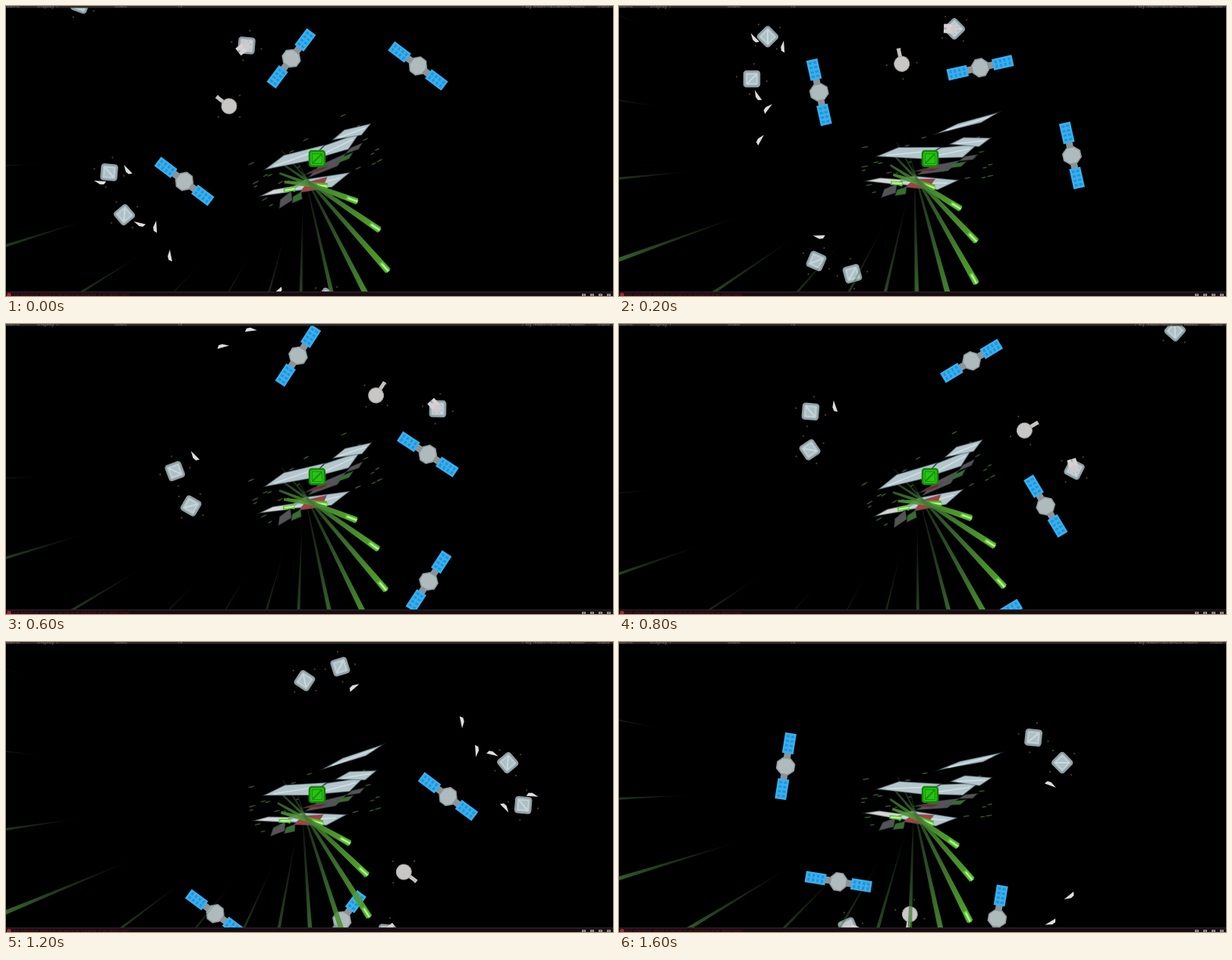
An HTML page with a canvas for the animation above (1.7 s loop, 800 by 382 pixels).

```html
<!DOCTYPE html>
<html>
<head>
<meta charset="utf-8">
<style>
html, body { margin: 0; height: 100%; overflow: hidden; background: #000; }
canvas { display: block; }
</style>
</head>
<body>
<canvas id="stage" width="800" height="382"></canvas>
<script>
const ctx = document.getElementById('stage').getContext('2d');
const LOOP = 1700, STEP = 100, CX = 410, CY = 201, RAD = Math.PI / 180;
const TURN_RATE = 0.142; // degrees per ms

// Uneven swing on top of the steady turn: time (ms), degrees
const SWING = [[0, 0], [200, 11.9], [600, 1], [1000, -4.4], [1200, 9.2], [1400, -7.5], [1600, 14.8]];
function swingAt(t) {
  const next = Math.max(1, SWING.findIndex(([time]) => time >= t));
  const [t0, a] = SWING[next - 1], [t1, b] = SWING[next];
  return a + (b - a) * (t - t0) / (t1 - t0);
}

function placed(x, y, angle, draw) {
  ctx.save();
  ctx.translate(x, y);
  ctx.rotate(angle * RAD);
  draw();
  ctx.restore();
}
function rect(x, y, w, h, color) {
  ctx.fillStyle = color;
  ctx.fillRect(x, y, w, h);
}
function paint(fill, edge, width) {
  ctx.fillStyle = fill;
  ctx.fill();
  if (!edge) return;
  ctx.lineWidth = width;
  ctx.strokeStyle = edge;
  ctx.stroke();
}
function polygon(points, fill, edge, width = 1.5) {
  ctx.beginPath();
  for (const [x, y] of points) ctx.lineTo(x, y);
  ctx.closePath();
  paint(fill, edge, width);
}
function line(x1, y1, x2, y2, color, width) {
  ctx.beginPath();
  ctx.moveTo(x1, y1);
  ctx.lineTo(x2, y2);
  ctx.lineWidth = width;
  ctx.strokeStyle = color;
  ctx.stroke();
}
function disc(x, y, r, fill, edge) {
  ctx.beginPath();
  ctx.arc(x, y, r, 0, 7);
  paint(fill, edge, 1);
}
function tile(fill, edge, mark) {
  ctx.beginPath();
  ctx.roundRect(-10, -10, 20, 20, 3);
  paint(fill, edge, 2.5);
  ctx.lineWidth = 1;
  ctx.strokeStyle = mark;
  ctx.strokeRect(-6.5, -6.5, 13, 13);
  line(-6, 6, 6, -6, mark, 2);
}

function dust() {
  for (let i = 0; i < 4; i++) placed(0, 0, 8 + 90 * i, () => rect(19, -1, 2, 2, i % 2 ? '#4b3d2c' : '#33452f'));
}
function crate() {
  dust();
  tile('#adc0c6', '#8f9da1', '#cad8dc');
}
function gunCrate() {
  crate();
  placed(0, 0, 137, () => {
    rect(-4, -6, 10, 12, '#cfc9cb');
    for (const y of [-6, 1]) rect(4, y, 10, 5, '#d8d1d3');
  });
}
function turret() {
  dust();
  rect(6, -2.5, 15, 5, '#c6c2c2');
  disc(0, 0, 10, '#c9c6c6', '#a6a3a3');
}
function satellite() {
  for (const side of [0, 180]) {
    placed(0, 0, side, () => {
      rect(9, -4.5, 9, 9, '#8d9396');
      rect(17, -7.5, 27, 15, '#38b0ef');
      for (let x = 20; x < 42; x += 6) {
        for (const y of [-5, 1]) rect(x, y, 3, 4, '#2193da');
      }
    });
  }
  const hub = Array.from({ length: 8 }, (_, i) => {
    const a = (i + 0.5) * 45 * RAD;
    return [11.5 * Math.cos(a), 12.5 * Math.sin(a)];
  });
  polygon(hub, '#afbabd', '#8c979b');
}
function shard() {
  polygon([[-8, -2], [8, -1], [5, 3], [0, 3]], '#dedcdc');
}

// [draw, x, y, angle], offsets from the player at time 0
const DEBRIS = [
  [satellite, -34, -132, -53], [satellite, 133, -122, 37], [satellite, -175, 30, 37],
  [turret, -116, -69, 217], [gunCrate, -93, -149, 5],
  [crate, -274, 18, 95], [crate, -254, 74, -40], [crate, -34, 202, -17],
  [crate, 13, 184, 124], [crate, -312, -204, 20],
  [shard, -250, 15, 42], [shard, -286, 31, 0], [shard, -234, 86, 10],
  [shard, -213, 90, 83], [shard, -194, 128, 75], [shard, -52, 175, -45]
];
function drawDebris(t, swing) {
  const turn = TURN_RATE * t;
  placed(CX, CY, turn + swing, () => {
    ctx.translate(14.5 * Math.sin(turn * RAD), 17 * (Math.cos(turn * RAD) - 1));
    for (const [draw, x, y, angle] of DEBRIS) placed(x, y, angle, draw);
  });
}

// Hull plates: [fill, x, y, half length, half thickness, angle], relative to the player
const STEEL = '#b3c6cc', GREY = '#555356', GREEN = '#33702a', RED = '#b03c42';
const LOWER = [
  [GREY, -41, 55, 13, 6, -50], [GREY, 14, 10, 28, 6, -30], [STEEL, 0, 33, 45, 9, -14],
  ['#d6d6d6', -49, 43, 26, 4, -14], [RED, -4, 36, 20, 8, -25], ['#7d1f25', 1, 15, 16, 2, -20],
  [GREEN, -26, 52, 9, 5, -45]
];
const UPPER = [
  [GREEN, 36, 0, 13, 3, -30], [GREY, 49, -13, 12, 3, -30],
  [STEEL, -29, 0, 42, 9, -20], [STEEL, 24, -14, 37, 9, -26], [STEEL, 46, -34, 27, 7, -20]
];
const LOOSE_PLATE = [STEEL, 37, -57, 42, 4, -32];

function drawPlates(plates) {
  for (const [fill, x, y, long, thick, angle] of plates) {
    placed(x, y, angle, () => {
      polygon([[-long, 0], [-0.3 * long, -thick], [long, -0.4 * thick], [0.4 * long, thick]], fill, 'rgba(70,85,92,.45)');
      if (fill === STEEL) line(-0.7 * long, 0, 0.7 * long, 0, '#d3e0e3', 1.5);
    });
  }
}
function drawFlecks() {
  let seed = 11;
  const random = () => (seed = seed * 16807 % 2147483647) / 2147483647;
  placed(-5, 4, -26, () => {
    for (let i = 0; i < 30; i++) {
      ctx.beginPath();
      ctx.ellipse((random() - 0.5) * 165, (random() - 0.5) * 75, 2 + random() * 3, 0.9, 0, 0, 7);
      paint(i % 3 ? '#27511f' : '#43402f');
    }
  });
}

// Shots leave at a steady rate, so their trails form a fan around the player
function drawShot(i) {
  const head = 69 + 52 * i, tail = head - 280, start = Math.max(tail, -40);
  const half = r => 4.3 * (r - tail) / 280;
  const muzzle = start > tail ? half(start) / 2 : 0;
  const glow = ctx.createLinearGradient(tail, 0, head, 0);
  glow.addColorStop(0, 'rgba(66,105,62,0)');
  glow.addColorStop(0.25, 'rgba(62,105,57,.35)');
  glow.addColorStop(0.6, 'rgba(66,122,54,.75)');
  glow.addColorStop(1, 'rgb(84,168,44)');
  polygon([[start, -muzzle], [head, -half(head)], [head, half(head)], [start, muzzle]], glow);
  if (head < 200) {
    rect(head - 15, -2.5, 16, 5, '#62cf38');
    rect(head - 13, -1, 13, 2, '#c2f5a8');
  }
}
function drawShots(swing) {
  for (let i = -2; i < 14; i++) {
    placed(CX, CY, 20 + 14.25 * i + swing, () => {
      ctx.translate(0, Math.min(35, Math.max(14, 35 - 3.5 * i)));
      drawShot(i);
    });
  }
}

function label(text, x, y, color) {
  ctx.fillStyle = color;
  ctx.fillText(text, x, y);
}
function drawBars() {
  rect(0, 0, 800, 2.5, '#2c2c2c');
  ctx.font = '7px Roboto, sans-serif';
  [['Game', 0], ['Display 1', 41], ['Scale', 143], ['1x', 225], ['Play Maximized', 680], ['Mute Audio', 727], ['Stats', 779]]
    .forEach(([text, x]) => label(text, x, 2, '#777'));
  rect(0, 376, 800, 6, '#190b10');
  rect(0, 376, 800, 1.5, '#242226');
  ctx.font = '5.5px Roboto, sans-serif';
  label('Null reference: object is not set to an instance of an object here', 8, 382, '#64101d');
  disc(4, 380.5, 2.8, '#a82730');
  for (let x = 759; x < 800; x += 11) {
    rect(x, 379, 5, 3, '#999');
    rect(x + 1.5, 380, 2, 1, '#333');
  }
}

function render(t) {
  const swing = swingAt(t);
  const onShip = draw => placed(CX, CY, 1.2 * swing, draw);
  rect(0, 0, 800, 382, '#000');
  drawDebris(t, swing);
  onShip(() => {
    drawFlecks();
    drawPlates(LOWER);
  });
  drawShots(swing);
  onShip(() => drawPlates(swing > 2 ? [...UPPER, LOOSE_PLATE] : UPPER));
  placed(CX, CY, 0, () => tile('#27c312', '#16850d', '#17930b'));
  drawBars();
}

function tick() {
  render(Math.floor(performance.now() % LOOP / STEP) * STEP);
  requestAnimationFrame(tick);
}
tick();
</script>
</body>
</html>
```
